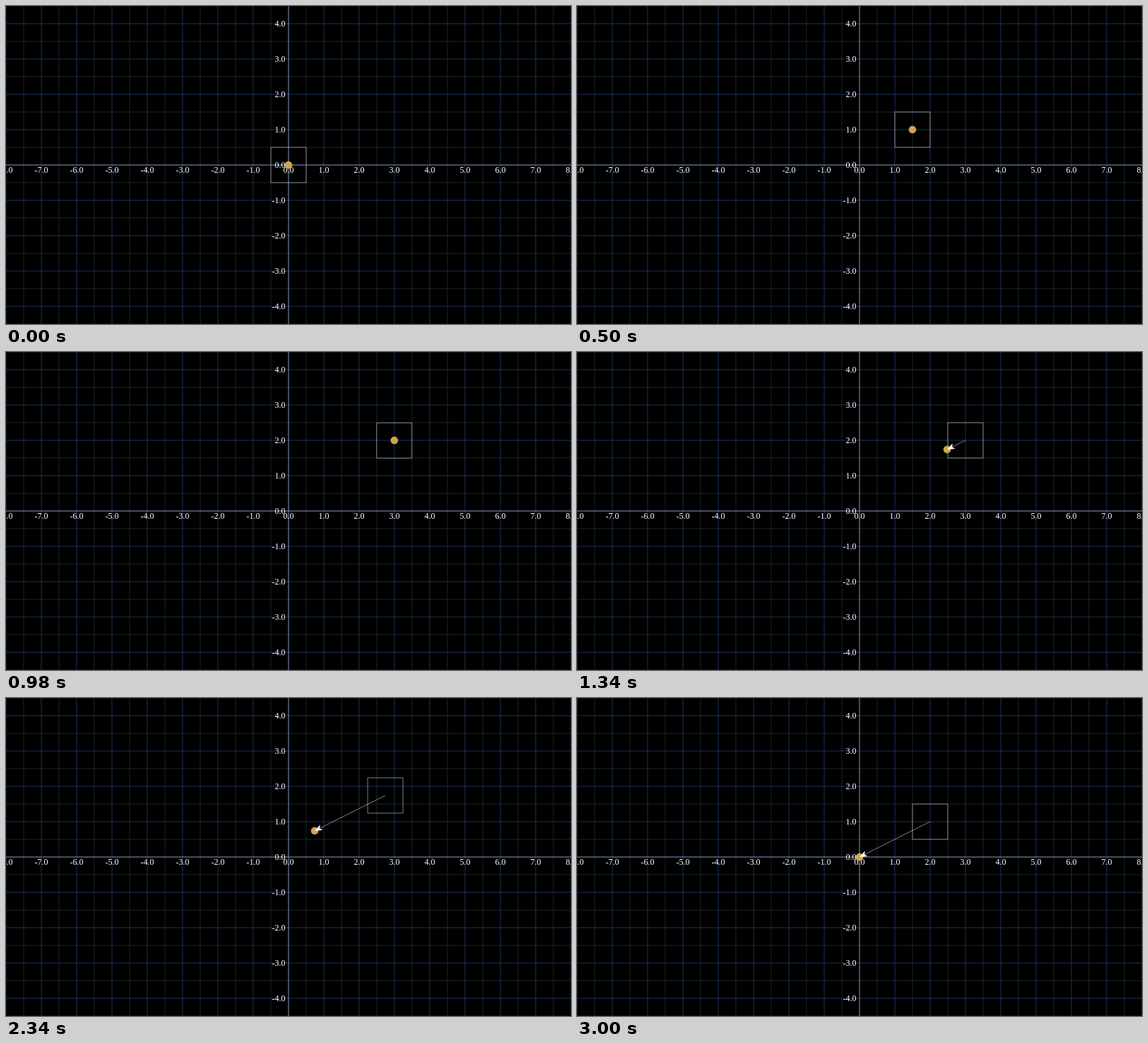
Write an HTML page that moves like this. It is 800 px wide and 450 px high and loops after 4 s.

```html
<!DOCTYPE html>
<html lang="en">
<head>
<meta charset="utf-8">
<title>Vector on a grid</title>
<style>
  html, body { margin: 0; width: 100%; height: 100%; overflow: hidden; background: #000; }
  svg { display: block; width: 100vw; height: 100vh; }
  text { font: 12.1px "Liberation Serif", "Noto Serif", serif; fill: #fff; }
</style>
</head>
<body>
<svg viewBox="0 0 800 450">
  <path id="minor" stroke="#1e342e" stroke-width=".8"/>
  <path id="major" stroke="#2c5088" stroke-width=".65"/>
  <path id="axes" stroke="#a4b0c6" stroke-width=".7" d="M0 225H800M400 0V450"/>
  <g id="labels"></g>
  <rect id="square" x="-25" y="-25" width="50" height="50" fill="none" stroke="#f4f4f0" stroke-width=".5"/>
  <circle id="dot" r="5" fill="#d3a348" stroke="#e8cd92" stroke-width=".5"/>
  <g id="arrow">
    <path id="shaft" stroke="#fff" stroke-width=".45"/>
    <path id="head" fill="#fff" d="M0 0L10.7 4.3L8 0L10.7 -4.3Z"/>
  </g>
</svg>
<script>
const UNIT = 50, CX = 400, CY = 225, LOOP = 4000, STEP = 20;
const el = id => document.getElementById(id);
const px = x => CX + x * UNIT;
const py = y => CY - y * UNIT;

function gridPath(offset) {
  let d = '';
  for (let i = -8; i <= 8; i++) d += `M${px(i + offset)} 0V450`;
  for (let i = -5; i <= 5; i++) d += `M0 ${py(i + offset)}H800`;
  return d;
}

function label(value, x, y, anchor) {
  const t = document.createElementNS('http://www.w3.org/2000/svg', 'text');
  t.setAttribute('x', x);
  t.setAttribute('y', y);
  t.setAttribute('text-anchor', anchor);
  t.textContent = value.toFixed(1);
  el('labels').append(t);
}

el('minor').setAttribute('d', gridPath(0.5));
el('major').setAttribute('d', gridPath(0));
for (let i = -8; i <= 8; i++) label(i, px(i), 236.4, 'middle');
for (let i = -4; i <= 4; i++) label(i, 395.6, py(i) + 4, 'end');

// Sine ease over the one-second stretch beginning at start
function ease(t, start) {
  const p = Math.min(1, Math.max(0, (t - start) / 1000));
  return (1 - Math.cos(Math.PI * p)) / 2;
}

function draw(t) {
  const go = ease(t, 0), split = ease(t, 1000), shift = ease(t, 2000);
  const sx = px(3 * go - shift), sy = py(2 * go - shift);
  const dx = sx - 2 * UNIT * split, dy = sy + UNIT * split;
  el('square').setAttribute('transform', `translate(${sx} ${sy})`);
  el('dot').setAttribute('transform', `translate(${dx} ${dy})`);

  const length = Math.hypot(sx - dx, sy - dy);
  const angle = Math.atan2(-1, 2) * 180 / Math.PI;
  el('arrow').setAttribute('visibility', split > 0 ? 'visible' : 'hidden');
  el('arrow').setAttribute('transform', `translate(${dx} ${dy}) rotate(${angle})`);
  el('shaft').setAttribute('d', length > 8 ? `M8 0H${length}` : '');
}

function tick() {
  draw(Math.floor(performance.now() % LOOP / STEP) * STEP);
  requestAnimationFrame(tick);
}
tick();
</script>
</body>
</html>
```
